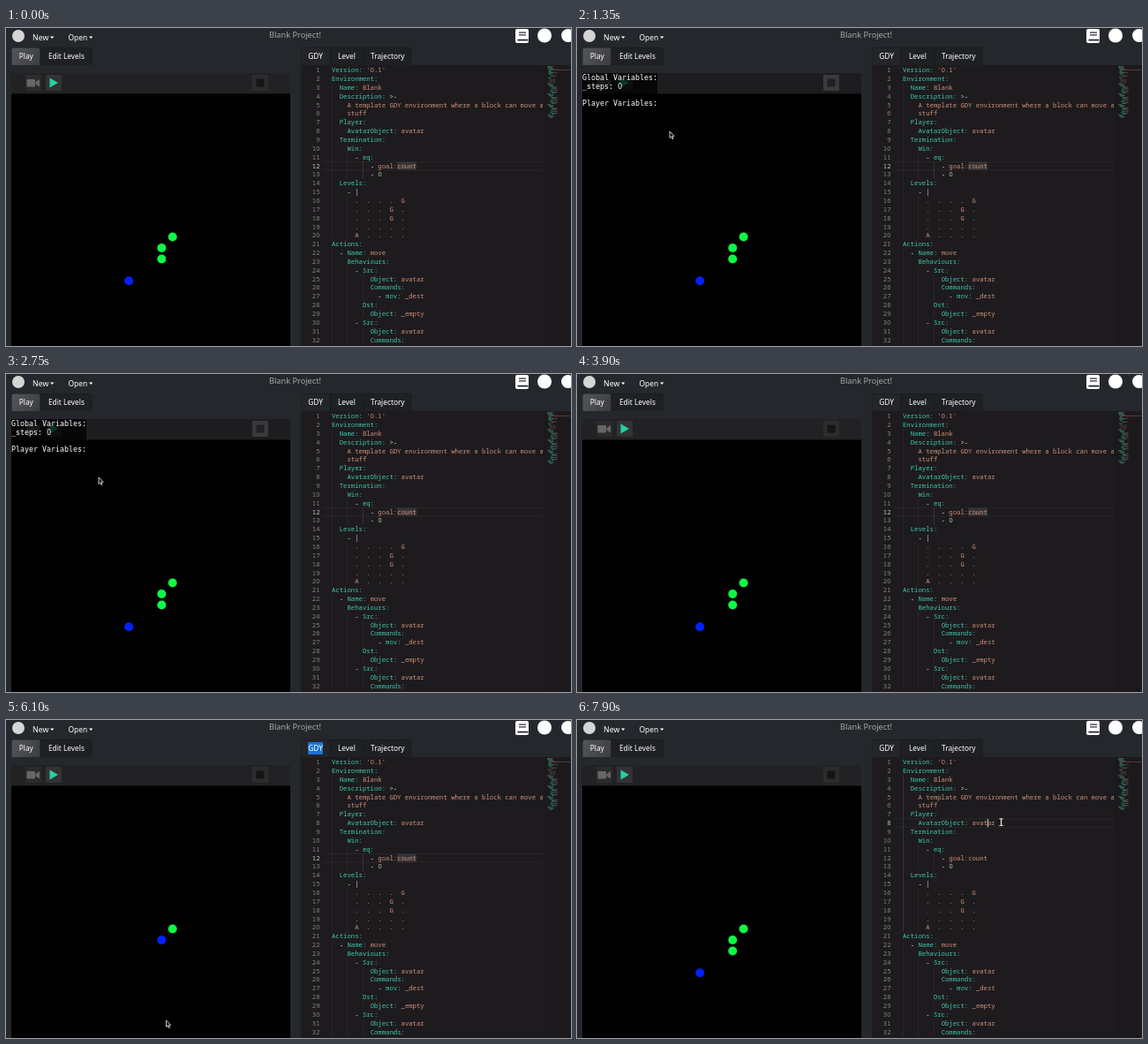
An HTML page with a canvas that plays this animation: 640 by 360 pixels, repeating every 8000 ms.

```html
<!DOCTYPE html>
<html lang="en">
<head>
<meta charset="utf-8">
<title>Blank Project!</title>
<style>
html, body { margin: 0; width: 100%; height: 100%; overflow: hidden; background: #24272c; }
canvas { display: block; width: 640px; height: 360px; }
</style>
</head>
<body>
<canvas id="stage"></canvas>
<script>
const LOOP = 8000;
const SANS = '"Noto Sans", "Open Sans", sans-serif';
const CODE = '"Noto Sans Mono", "DejaVu Sans Mono", monospace';
const MONO = '"DejaVu Sans Mono", "Liberation Mono", monospace';
const PAGE = '#24272c', EDITOR = '#1e1b1e';
const KEY = '#3dc9b0', STR = '#ce9178', NUM = '#b5cea8', PLAIN = '#d4d4d4';
const CHAR = 4.363, LINE = 9.85, LEFT = 369, TOP = 47.6;

const canvas = document.getElementById('stage');
const c = canvas.getContext('2d');
const dpr = window.devicePixelRatio || 1;
canvas.width = 640 * dpr;
canvas.height = 360 * dpr;

const source = `Version: '0.1'
Environment:
  Name: Blank
  Description: >-
    A template GDY environment where a block can move a
    stuff
  Player:
    AvatarObject: avatar
  Termination:
    Win:
      - eq:
          - goal:count
          - 0
  Levels:
    - |
      .  .  .  .  G
      .  .  .  G  .
      .  .  .  G  .
      .  .  .  .  .
      A  .  .  .  .
Actions:
  - Name: move
    Behaviours:
      - Src:
          Object: avatar
          Commands:
            - mov: _dest
        Dst:
          Object: _empty
      - Src:
          Object: avatar
          Commands:`.split('\n');
const indents = source.map(line => line.search(/\S/));

// Splits a YAML line into [column, text, colour] parts.
function tokens(line) {
  const out = [];
  let col = line.search(/\S/);
  let rest = line.slice(col);
  const add = (s, color) => { out.push([col, s, color]); col += s.length; };
  if (rest.startsWith('- ')) {
    add('- ', PLAIN);
    rest = rest.slice(2);
  }
  const key = rest.match(/^(\w+:)( |$)/);
  if (key) {
    add(key[1], KEY);
    col += key[2].length;
    rest = rest.slice(key[0].length);
  }
  if (rest) add(rest, /^(>-|\|)$/.test(rest) ? PLAIN : /^\d+$/.test(rest) ? NUM : STR);
  return out;
}
const lines = source.map(tokens);

function rect(x, y, w, h, color) {
  c.fillStyle = color;
  c.fillRect(x, y, w, h);
}

function box(x, y, w, h, r, color) {
  c.fillStyle = color;
  c.beginPath();
  c.roundRect(x, y, w, h, r);
  c.fill();
}

function dot(x, y, r, color) {
  c.fillStyle = color;
  c.beginPath();
  c.arc(x, y, r, 0, Math.PI * 2);
  c.fill();
}

function poly(points, color, edge) {
  c.beginPath();
  points.forEach(([x, y]) => c.lineTo(x, y));
  c.closePath();
  c.fillStyle = color;
  c.fill();
  if (edge) {
    c.strokeStyle = edge;
    c.lineWidth = 0.8;
    c.stroke();
  }
}

function text(s, x, y, size, color, family = SANS, align = 'left') {
  c.font = `${size}px ${family}`;
  c.fillStyle = color;
  c.textAlign = align;
  c.textBaseline = 'alphabetic';
  c.fillText(s, x, y);
}

// Fixed-pitch text; zeros come from the sans face, which has no dot inside.
function mono(s, x, y, size, color, family, pitch) {
  text(s.replaceAll('0', ' '), x, y, size, color, family);
  [...s].forEach((ch, i) => {
    if (ch === '0') text(ch, x + (i + 0.5) * pitch, y, size, color, SANS, 'center');
  });
}

const code = (s, x, y, color) => mono(s, x, y, 7.27, color, CODE, CHAR);

function header() {
  dot(14, 9, 7, '#d5d5d5');
  text('New', 30, 14, 8.8, '#fff');
  poly([[50, 9.5], [54.4, 9.5], [52.2, 12]], '#fff');
  text('Open', 70.5, 14, 8.4, '#fff');
  poly([[94, 9.5], [98.4, 9.5], [96.2, 12]], '#fff');
  text('Blank Project!', 327.5, 10.6, 9.2, '#a5a7a9', SANS, 'center');
  box(577, 1, 15, 16, 2, '#fff');
  rect(581, 4.5, 8, 1.2, PAGE);
  rect(581, 7.3, 8, 1.2, PAGE);
  rect(579.5, 12.7, 12, 1.8, PAGE);
  dot(610, 8.5, 8, '#fff');
  dot(636.5, 8.5, 7.5, '#fff');
}

function tab(label, x, w, tx, fill = '#1e2023') {
  box(x, 22, w, 20, [2, 2, 0, 0], '#18191c');
  box(x + 0.5, 22.5, w - 1, 19.5, [2, 2, 0, 0], fill);
  text(label, tx, 35, 8.3, '#fff');
}

function tabs(selected) {
  const shine = c.createLinearGradient(6, 22, 39, 42);
  shine.addColorStop(0, '#55575a');
  shine.addColorStop(1, '#3a3c3f');
  tab('Play', 6, 33, 14.8, shine);
  tab('Edit Levels', 39, 58.5, 48);
  tab('GDY', 334.5, 32.5, 342.3, '#232529');
  tab('Level', 367, 37.5, 376);
  tab('Trajectory', 404.5, 55, 413);
  if (selected) {
    rect(342, 25, 17, 14, '#1a73d9');
    text('GDY', 342.3, 35, 8.3, '#fff');
  }
}

function toolbar(panel) {
  rect(6, 51, 316, 309, '#000');
  rect(6, 51, 316, 23.5, panel ? '#1d1d1f' : '#222224');
  box(22, 53, 18, 18, 1, '#2b2b2c');
  box(23.5, 58, 9.5, 8.5, 1, '#676767');
  poly([[33.5, 61], [38, 58], [38, 66.5], [33.5, 63.5]], '#676767');
  box(45, 53, 18, 18, 1, '#333335');
  poly([[49.5, 56.5], [59, 62], [49.5, 67.5]], '#25d0a4');
  box(279, 53, 18, 18, 1, panel ? '#3a3a3c' : '#2c2c2e');
  box(283.5, 57.5, 9, 9, 1, panel ? '#202022' : '#151515');
}

function variables() {
  rect(6, 51, 85, 40, 'rgba(0,0,0,.74)');
  ['Global Variables:', '_steps: 0', '', 'Player Variables:'].forEach((s, i) =>
    mono(s, 6, 59 + i * 9.8, 8.3, '#fff', MONO, 5));
}

// Avatar path: [time, column, row]
const moves = [[0, 0, 4], [4650, 1, 4], [4900, 2, 4], [5250, 3, 4], [5500, 3, 3],
  [5750, 3, 2], [6000, 3, 1], [6300, 3, 0], [6600, 0, 4]];
const goals = [[4, 0, 0], [3, 1, 6000], [3, 2, 5750]];

function game(t) {
  const place = (col, row, color) => dot(139.2 + col * 12.37, 286.3 - (4 - row) * 12.43, 5, color);
  for (const [col, row, taken] of goals) {
    if (!taken || t < taken || t >= 6600) place(col, row, '#0cfb45');
  }
  const [, col, row] = moves.filter(m => m[0] <= t).pop();
  place(col, row, '#0220fc');
}

function minimap() {
  rect(608, 42, 32, 318, '#1c191c');
  c.globalAlpha = 0.65;
  for (let i = 0; i < 60; i++) {
    const row = i < 32 ? i : 20 + (i - 32) % 12;
    for (const [col, s, color] of lines[row]) {
      [...s].forEach((ch, k) => {
        if (ch !== ' ') rect(613 + (col + k) * 0.48, 43 + i * 0.98, 0.48, 0.7, color);
      });
    }
  }
  c.globalAlpha = 1;
}

// Vertical indent lines; the block around the active line is brighter.
function guides(active) {
  const at = active - 1;
  const inner = Math.ceil(indents[at] / 4) * 4 - 4;
  let first = at, last = at;
  while (indents[first - 1] > inner) first--;
  while (indents[last + 1] > inner) last++;
  indents.forEach((n, i) => {
    for (let col = 0; col < n; col += 4) {
      const lit = col === inner && i >= first && i <= last;
      rect(LEFT + col * CHAR, TOP + (i - 0.5) * LINE, 0.6, LINE, lit ? '#4a484a' : '#302e30');
    }
  });
}

function editor(active) {
  rect(334, 42, 306, 318, EDITOR);
  const y = TOP + (active - 1) * LINE;
  rect(360, y - 5, 248, 0.8, '#282628');
  rect(360, y + 4.6, 248, 0.8, '#282628');
  guides(active);
  if (active === 12) rect(443, y - 4.4, 22, 9.2, '#363436');
  lines.forEach((parts, i) => {
    const base = TOP + i * LINE + 2.6;
    const label = String(i + 1);
    code(label, 355.5 - label.length * CHAR, base, i + 1 === active ? '#c6c6c6' : '#858585');
    for (const [col, s, color] of parts) code(s, LEFT + col * CHAR, base, color);
  });
  if (active === 8) rect(464.8, y - 4.6, 1, 9.4, '#d8d8d8');
  minimap();
}

// Pointer path: [time, x, y]; off stage below y = 360
const path = [[0, 60, 372], [450, 60, 372], [900, 105, 117], [3150, 105, 117], [3450, 118, 372],
  [3950, 183, 372], [4300, 181.5, 340], [6650, 181.5, 340], [6800, 310, 190], [6930, 432, 70],
  [7050, 434, 112.5], [7250, 434, 112.5], [7450, 464, 112], [7700, 464, 112], [7850, 480.5, 111.5],
  [8000, 480.5, 111.5]];

function pointer(t) {
  const i = path.findIndex(p => p[0] > t);
  const [t0, x0, y0] = path[i - 1], [t1, x1, y1] = path[i];
  const u = (t - t0) / (t1 - t0), e = u * u * (3 - 2 * u);
  const x = x0 + (x1 - x0) * e, y = y0 + (y1 - y0) * e;
  if (y > 360) return;
  if (t >= 7400) {
    rect(x - 0.6, y, 1.2, 8.5, '#eee');
    rect(x - 2.2, y, 4.4, 0.9, '#eee');
    rect(x - 2.2, y + 7.6, 4.4, 0.9, '#eee');
    return;
  }
  const shape = [[0, 0], [0, 7.4], [1.7, 5.9], [2.9, 8.6], [4, 8.1], [2.9, 5.5], [5.1, 5.3]];
  poly(shape.map(([a, b]) => [x + a, y + b]), '#111', '#f0f0f0');
}

function draw(t) {
  c.setTransform(dpr, 0, 0, dpr, 0, 0);
  const panel = t >= 1000 && t < 3250;
  rect(0, 0, 640, 360, PAGE);
  header();
  tabs(t >= 4100 && t < 7600);
  toolbar(panel);
  if (panel) variables();
  game(t);
  editor(t < 7600 ? 12 : 8);
  pointer(t);
}

const start = performance.now();
function tick() {
  draw((performance.now() - start) % LOOP);
  requestAnimationFrame(tick);
}
tick();
</script>
</body>
</html>
```
